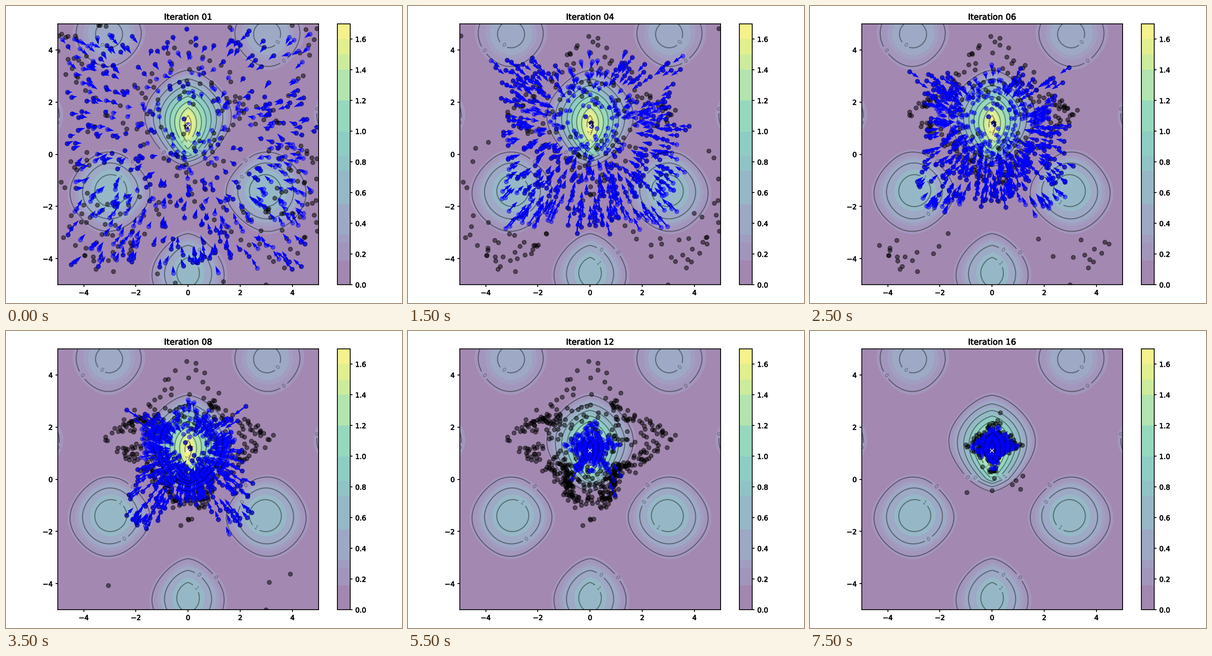
A matplotlib script for the animation above (8000 ms loop, 864 by 648 pixels).

```python
import numpy as np
import matplotlib.pyplot as plt
from matplotlib.animation import FuncAnimation
from matplotlib.colors import ListedColormap
from matplotlib.patheffects import withStroke

W, H, DPI = 864, 648, 108
N_PARTICLES, N_FRAMES, WARM_UP = 500, 16, 1
INERTIA, C_SELF, C_SWARM = 0.8, 0.1, 0.1

plt.rcParams.update({"axes.linewidth": 1.2, "xtick.major.width": 1.2,
                     "ytick.major.width": 1.2})


def f(x, y):
    return (np.cos(x) + np.sin(y)) ** 2 / (1 + np.abs(x) + np.abs(y))


def simulate():
    """Return (position, velocity, personal best, global best) per frame."""
    rng = np.random.RandomState(100)
    X = rng.rand(2, N_PARTICLES) * 10 - 5
    V = rng.randn(2, N_PARTICLES) * 0.1
    pbest, best = X.copy(), f(*X)
    gbest = pbest[:, best.argmax()].copy()
    states = []
    for _ in range(WARM_UP + N_FRAMES):
        r1, r2 = rng.rand(2)
        V = (INERTIA * V + C_SELF * r1 * (pbest - X)
             + C_SWARM * r2 * (gbest[:, None] - X))
        X = X + V
        obj = f(*X)
        # The stored place trails behind while a particle is climbing
        moved = obj <= best
        pbest[:, moved] = X[:, moved]
        best = np.maximum(best, obj)
        gbest = pbest[:, best.argmax()].copy()
        states.append((X, V, pbest.copy(), gbest))
    return states[WARM_UP:]


def banded_viridis(top):
    """Viridis in flat steps of uneven height."""
    edges = np.array([0, 0.158, 0.275, 0.325, 0.525, 0.74, 0.84,
                      1.0, 1.2, 1.4, 1.5, 1.6, top])
    mids = (edges[:-1] + edges[1:]) / 2 / top
    values = (np.arange(512) + 0.5) / 512 * top
    band = np.clip(np.searchsorted(edges, values) - 1, 0, len(mids) - 1)
    return ListedColormap(plt.get_cmap("viridis")(mids[band]))


def place(axes, left, bottom, width, height):
    axes.set_position([left / W, bottom / H, width / W, height / H])


def thicken(texts):
    for text in texts:
        text.set_path_effects([withStroke(linewidth=0.5, foreground="black")])


states = simulate()
x, y = np.meshgrid(np.linspace(-5, 5, 1000), np.linspace(-5, 5, 1000))
z = f(x, y)
peak = z.argmax()

fig, ax = plt.subplots(figsize=(W / DPI, H / DPI), dpi=DPI)
img = ax.imshow(z, extent=[-5, 5, -5, 5], origin="lower", vmin=0,
                cmap=banded_viridis(z.max()), alpha=0.5)
cbar = fig.colorbar(img, ax=ax)
ax.plot([x.ravel()[peak]], [y.ravel()[peak]], marker="x", markersize=5,
        color="white")
contours = ax.contour(x, y, z, 10, colors="black", alpha=0.4)
ax.clabel(contours, inline=True, fontsize=8, fmt="%.0f")

X, V, pbest, gbest = states[0]
pbest_dots = ax.scatter(*pbest, marker="o", color="black", alpha=0.5)
dots = ax.scatter(*X, marker="o", color="blue", alpha=0.5)
arrows = ax.quiver(*X, *V, color="blue", width=0.005, angles="xy",
                   scale_units="xy", scale=1)
star = ax.scatter(*gbest[:, None], marker="*", s=100, color="black", alpha=0.4)
ax.set_xlim(-5, 5)
ax.set_ylim(-5, 5)
title = ax.set_title("Iteration 01")

place(ax, 112.6, 39.8, 569.3, 569.3)
place(cbar.ax, 723, 39.8, 28.5, 569.3)
thicken([title, *ax.get_xticklabels(), *ax.get_yticklabels(),
         *cbar.ax.get_yticklabels()])


def animate(i):
    X, V, pbest, gbest = states[i]
    title.set_text(f"Iteration {i + 1:02d}")
    pbest_dots.set_offsets(pbest.T)
    dots.set_offsets(X.T)
    arrows.set_offsets(X.T)
    arrows.set_UVC(*V)
    star.set_offsets(gbest[None, :])
    return title, pbest_dots, dots, arrows, star


anim = FuncAnimation(fig, animate, frames=N_FRAMES, interval=500,
                     repeat=True, repeat_delay=0)
plt.show()
```
